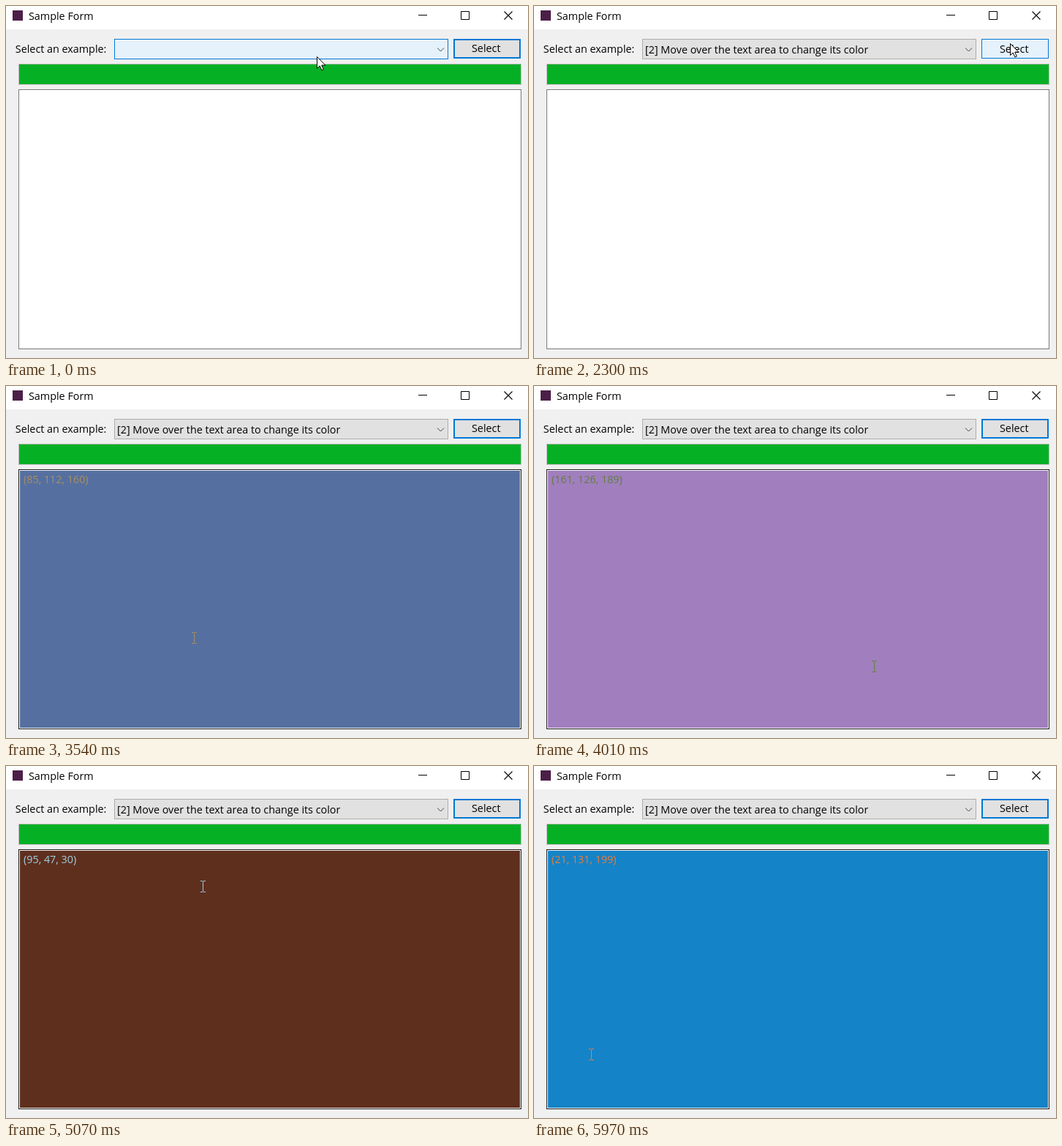
An HTML page for the animation above (6100 ms loop, 714x482 px).

```html
<!DOCTYPE html>
<html lang="en">
<head>
<meta charset="utf-8">
<title>Sample Form</title>
<style>
  html, body { margin: 0; width: 100%; height: 100%; overflow: hidden; background: #f0f0f0; }
  svg { display: block; width: 714px; height: 482px; }
  text { font: 14.35px "Open Sans", "Noto Sans", sans-serif; fill: #000; white-space: pre; }
  .line { fill: none; stroke: #000; }
  .combo { fill: #e1e1e1; stroke: #adadad; }
  .combo.hover { fill: #e5f1fb; stroke: #0078d7; }
  .combo.pressed { fill: #cce4f7; stroke: #005499; }
  .button { fill: #e1e1e1; stroke: #adadad; }
  .button.focus { stroke: #0078d7; stroke-width: 2; }
  .button.hover { fill: #e5f1fb; stroke: #0078d7; stroke-width: 1; }
  .button.pressed { fill: #cce4f7; stroke: #005499; stroke-width: 1; }
  .frame { fill: #fff; stroke: #0078d7; filter: drop-shadow(2px 2px 1px rgba(0, 0, 0, .45)); }
  .item rect { fill: none; }
  .item.on rect { fill: #0078d7; }
  .item.on text { fill: #fff; }
  #beam { fill: none; shape-rendering: crispEdges; }
</style>
</head>
<body>
<svg viewBox="0 0 714 482">
  <clipPath id="roll"><rect id="rollBox" x="148" y="73" width="462"/></clipPath>
  <rect width="714" height="482" fill="#f0f0f0"/>

  <rect width="714" height="32" fill="#fff"/>
  <rect x="9" y="6" width="14" height="14" fill="#4b1f47"/>
  <text x="31" y="19">Sample Form</text>
  <path class="line" d="M564 12.5h12M622.5 7.5h11v11h-11z"/>
  <path class="line" stroke-width="1.1" d="M681.5 7.5l11 11m0-11l-11 11"/>

  <text x="12.8" y="64">Select an example:</text>
  <rect id="combo" x="148.5" y="45.5" width="456" height="27"/>
  <text id="choice" x="152" y="65">[2] Move over the text area to change its color</text>
  <path class="line" style="stroke:#444" d="M590 57.5l4.5 4.5l4.5-4.5"/>
  <rect id="button"/>
  <text id="buttonText" x="637">Select</text>

  <rect x="17.5" y="79.5" width="687" height="28" fill="#06b025" stroke="#bcbcbc"/>

  <rect id="area" x="17.5" y="114.5" width="687" height="355" fill="#fff"/>
  <rect id="paint" x="19" y="116" width="684" height="352"/>
  <text id="rgb" x="24" y="133"></text>

  <g id="list" clip-path="url(#roll)">
    <rect class="frame" x="148.5" y="73.5" width="456" height="61"/>
    <g class="item"><rect x="149" y="74" width="455" height="20"/><text x="151" y="90">[1] Click on the text area to add the current date to it</text></g>
    <g class="item"><rect x="149" y="94" width="455" height="20"/><text x="151" y="110">[2] Move over the text area to change its color</text></g>
    <g class="item"><rect x="149" y="114" width="455" height="20"/><text x="151" y="130">[3] Update the progress bar with the word count</text></g>
  </g>

  <path id="arrow" d="M.5 .5v16l3.7-3.5l2.7 6l2.4-1l-2.6-5.9h5.1z" fill="#fff" stroke="#000"/>
  <path id="beam" d="M-3 -7.5h3m1 0h3M.5 -7v14M-3 7.5h3m1 0h3"/>
</svg>
<script>
const LOOP = 6100, OPEN = 520, PICK = 1480;
const PICK_STEP = 11, CLICK_STEP = 26, LEAVE_STEP = 30, LAST_STEP = 76;

// Key points of the pointer: [step, x, y]
const PATH = [
  [-1, 425, 69], [10, 423, 102], [20, 650, 48], [29, 654, 56],
  [34, 124.7, 137], [35, 138, 127], [40, 231.7, 333.3], [41, 257, 345],
  [48, 500, 390], [56, 600, 173.7], [57, 600, 167], [62, 300, 150],
  [68, 111.7, 242], [69, 115, 242], [75, 78, 395]
];

const $ = id => document.getElementById(id);
const items = document.querySelectorAll(".item");
const clamp = (v, lo, hi) => Math.min(hi, Math.max(lo, v));
const inside = (x, y, l, t, r, b) => x >= l && x < r && y >= t && y < b;
const show = (el, on) => el.style.display = on ? "" : "none";

function setAttrs(el, attrs) {
  for (const name in attrs) el.setAttribute(name, attrs[name]);
}

// The screen refreshes in even steps, with a rest before the choice is made
function stepAt(ms) {
  if (ms < OPEN) return -1;
  if (ms < PICK) return Math.min(PICK_STEP - 1, Math.floor((ms - OPEN) / 76));
  return Math.min(LAST_STEP, PICK_STEP + Math.floor((ms - PICK + 20) / 69.1));
}

function pointer(step) {
  const next = PATH.findIndex(p => p[0] > step);
  if (next < 0) return PATH[PATH.length - 1].slice(1);
  const [s0, x0, y0] = PATH[next - 1], [s1, x1, y1] = PATH[next];
  const k = (step - s0) / (s1 - s0);
  return [x0 + (x1 - x0) * k, y0 + (y1 - y0) * k];
}

// The text area's colour follows the pointer position
function colorAt([x, y]) {
  return [0.3736 * (x - 21.5), 0.3595 * (y - 29.8), 0.719 * (y - 118)]
    .map(v => clamp(Math.floor(v), 0, 255));
}

function drawCombo(step, x, y) {
  const pressed = step >= 0 && step < PICK_STEP;
  const hover = inside(x, y, 148, 45, 605, 73);
  setAttrs($("combo"), { class: "combo" + (pressed ? " pressed" : hover ? " hover" : "") });
  show($("choice"), step >= PICK_STEP);

  show($("list"), pressed && step > 0);
  setAttrs($("rollBox"), { height: clamp(step * 22, 0, 66) });
  const active = Math.max(0, Math.floor((y - 74) / 20));
  items.forEach((item, i) => item.classList.toggle("on", i === active));
}

function drawButton(step, x, y) {
  const focus = step < 0 || step >= CLICK_STEP;
  const pressed = step === CLICK_STEP || step === CLICK_STEP + 1;
  const hover = inside(x, y, 612, 45, 704, 72);
  const inset = focus && !hover && !pressed ? 1 : 0.5;
  setAttrs($("button"), {
    class: "button" + (focus ? " focus" : "") + (pressed ? " pressed" : hover ? " hover" : ""),
    x: 612 + inset, y: 45 + inset, width: 92 - 2 * inset, height: 27 - 2 * inset
  });
  setAttrs($("buttonText"), { y: focus ? 63 : 64 });
}

function drawArea(step, over) {
  setAttrs($("area"), { stroke: over ? "#171717" : "#7a7a7a" });
  show($("paint"), over);
  show($("rgb"), over && step * 5 % 11 < 8); // the text flickers while it is rewritten
  if (!over) return;
  const color = colorAt(pointer(step - 0.3));
  const inverse = `rgb(${color.map(v => 255 - v)})`;
  setAttrs($("paint"), { fill: `rgb(${color})` });
  setAttrs($("beam"), { stroke: inverse });
  $("rgb").textContent = `(${color.join(", ")})`;
  $("rgb").style.fill = inverse;
}

function draw(ms) {
  const step = stepAt(ms);
  const [x, y] = pointer(step).map(Math.round);
  const over = step >= LEAVE_STEP && y > 114;

  drawCombo(step, x, y);
  drawButton(step, x, y);
  drawArea(step, over);

  show($("arrow"), !over);
  show($("beam"), over);
  setAttrs($(over ? "beam" : "arrow"), { transform: `translate(${x} ${y})` });
}

const start = performance.now();
function tick() {
  draw((performance.now() - start) % LOOP);
  requestAnimationFrame(tick);
}
tick();
</script>
</body>
</html>
```
